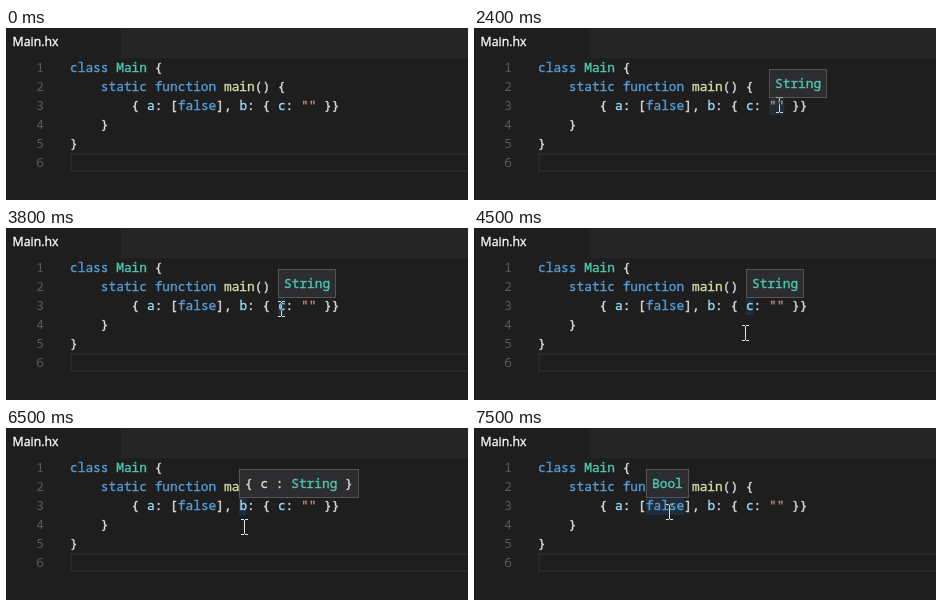
An HTML page that plays this animation: 462x172 px, repeating every 8 s.

```html
<!DOCTYPE html>
<html lang="en">
<head>
<meta charset="utf-8">
<title>Hover types in an editor</title>
<style>
  html, body { margin: 0; width: 100%; height: 100%; overflow: hidden; background: #1e1e1e; }
  svg { display: block; width: 462px; height: 172px; }
  .mono { font: 12.83px "Noto Sans Mono", "DejaVu Sans Mono", monospace; white-space: pre; }
  .tab { font: 12.3px "Open Sans", "Noto Sans", sans-serif; }
  text { fill: var(--ink, #dcdcdc); }
  tspan { fill: var(--ink, #dcdcdc); stroke: var(--ink, #dcdcdc); stroke-width: .35px; }
  .tab { --ink: #fff; stroke: #fff; stroke-width: .3px; }
  .k { --ink: #569cd6; }
  .t { --ink: #4ec9b0; }
  .f { --ink: #dcdcaa; }
  .v { --ink: #9cdcfe; }
  .s { --ink: #ce9178; }
  .n { --ink: #5a5a5a; }
  #beam { fill: none; stroke: #fff; mix-blend-mode: difference; }
</style>
</head>
<body>
<svg viewBox="0 0 462 172" xmlns="http://www.w3.org/2000/svg">
  <rect width="462" height="172" fill="#1e1e1e"/>
  <rect x="115" width="347" height="30" fill="#252526"/>
  <text class="tab" x="6.6" y="18">Main.hx</text>
  <rect x="65" y="126" width="410" height="17" fill="none" stroke="#282828" stroke-width="2"/>
  <g id="marks"></g>
  <g id="code"></g>
  <g id="tips"></g>
  <path id="beam" shape-rendering="crispEdges" d="M0 .5h3m1 0h3M3.5 1v14M0 15.5h3m1 0h3"/>
</svg>
<script>
const LOOP = 8000, STEP = 100;
const CHAR = 7.7, LEFT = 64, TOP = 30, LINE = 19, BASE = 14;
const NS = "http://www.w3.org/2000/svg";
const $ = id => document.getElementById(id);

function add(parent, tag, attrs, text) {
  const el = document.createElementNS(NS, tag);
  for (const key in attrs) el.setAttribute(key, attrs[key]);
  if (text !== undefined) el.textContent = text;
  parent.appendChild(el);
  return el;
}

const colX = col => LEFT + col * CHAR;

// Tokens are "class|text"; an empty class is plain text.
function addTokens(parent, x, y, tokens) {
  const line = add(parent, "text", { class: "mono", x, y });
  for (const token of tokens) {
    const [cls, text] = token.split("|");
    add(line, "tspan", { class: cls }, text);
  }
  return line.textContent.length;
}

const lines = [
  [0, ["k|class ", "t|Main", "| {"]],
  [4, ["k|static function ", "f|main", "|() {"]],
  [8, ["|{ ", "v|a", "|: [", "k|false", "|], ", "v|b", "|: { ", "v|c", "|: ", 's|""', "| }}"]],
  [4, ["|}"]],
  [0, ["|}"]],
  [0, []]
];

lines.forEach(([col, tokens], row) => {
  const y = TOP + row * LINE + BASE;
  add($("code"), "text", { class: "mono n", x: 38, y, "text-anchor": "end" }, row + 1);
  addTokens($("code"), colX(col), y, tokens);
});

// Hover boxes above the third line, each with its marked word.
const hovers = [
  { col: 30, word: 2, from: 2300, to: 3100, fade: true, tokens: ["t|String"] },
  { col: 27, word: 1, from: 3800, to: 4600, tokens: ["t|String"] },
  { col: 22, word: 1, from: 5600, to: 6600, tokens: ["|{ c : ", "t|String", "| }"] },
  { col: 14, word: 5, from: 7400, to: LOOP, fade: true, tokens: ["t|Bool"] }
];

for (const h of hovers) {
  const x = Math.round(colX(h.col));
  h.mark = add($("marks"), "rect", {
    x, y: TOP + 2 * LINE, width: h.word * CHAR, height: LINE, fill: "#264f78", "fill-opacity": .3
  });
  h.tip = add($("tips"), "g", {});
  const box = add(h.tip, "rect", { x: x + .5, y: 41.5, height: 28, fill: "#2d2d30", stroke: "#555" });
  const length = addTokens(h.tip, x + 6, 60, h.tokens);
  box.setAttribute("width", Math.round(length * CHAR + 12) - 1);
}

// Pointer moves: each bends from the last end point towards "via".
const linear = u => u;
const easeOut = u => 1 - (1 - u) ** 2;
const entry = { x: 238.5, y: 158 };
const moves = [
  { from: 900, to: 1700, via: { x: 355, y: 105 }, end: { x: 311.5, y: 89 }, ease: easeOut },
  { from: 1700, to: 2000, end: { x: 305.5, y: 77 } },
  { from: 2800, to: 3200, end: { x: 275.5, y: 99 } },
  { from: 3200, to: 3500, end: { x: 275.5, y: 81 } },
  { from: 4300, to: 5200, via: { x: 270, y: 152 }, end: { x: 238.5, y: 74 } },
  { from: 6300, to: 6500, end: { x: 238.5, y: 99 } },
  { from: 6500, to: 7100, via: { x: 226, y: 165 }, end: { x: 195.5, y: 84 } }
];

const mix = (a, b, u) => ({ x: a.x + (b.x - a.x) * u, y: a.y + (b.y - a.y) * u });

function pointerAt(t) {
  let at = entry;
  for (const { from, to, via, end, ease = linear } of moves) {
    if (t <= from) break;
    const u = ease(Math.min(1, (t - from) / (to - from)));
    at = via ? mix(mix(at, via, u), mix(via, end, u), u) : mix(at, end, u);
  }
  return at;
}

function render(ms) {
  const t = Math.floor((ms % LOOP) / STEP) * STEP;
  for (const h of hovers) {
    const shown = t >= h.from && t < h.to;
    h.tip.setAttribute("opacity", !shown ? 0 : h.fade && t === h.from ? .5 : 1);
    h.mark.setAttribute("opacity", shown ? 1 : 0);
  }
  const { x, y } = pointerAt(t);
  $("beam").setAttribute("visibility", t >= moves[0].from ? "visible" : "hidden");
  $("beam").setAttribute("transform", `translate(${Math.round(x - 3.5)} ${Math.round(y - 8)})`);
}

const start = performance.now();
function tick() {
  render(performance.now() - start);
  requestAnimationFrame(tick);
}
tick();
</script>
</body>
</html>
```
